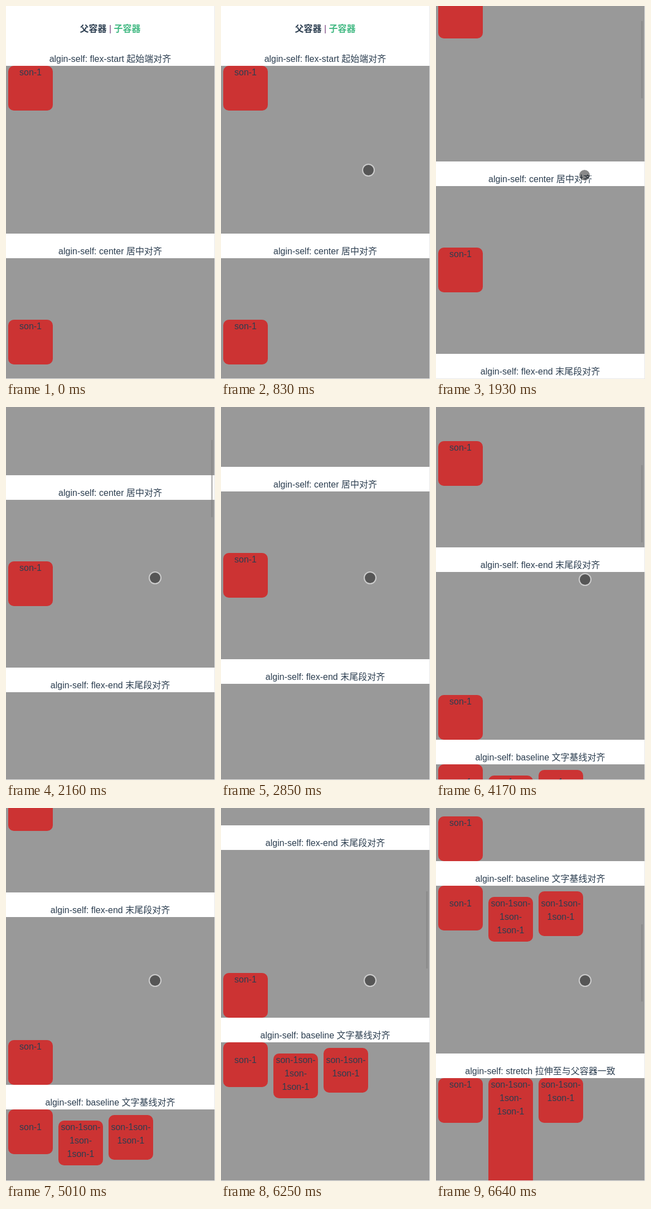
These frames come from a looping animation (375x667 px, 8000 ms). An HTML page:

```html
<!DOCTYPE html>
<html lang="zh-CN">
<head>
<meta charset="utf-8">
<title>align-self</title>
<style>
  html, body { margin: 0; width: 100%; height: 100%; overflow: hidden; background: #e6e6e6; }
  #view {
    position: absolute; left: 0; top: 0; width: 374px; height: 666px;
    overflow: hidden; background: #fff; color: #2c3e50; text-align: center;
    font: 16px/24px Arial, "Liberation Sans", "Noto Sans CJK SC", "Noto Sans CJK", sans-serif;
  }
  #page { position: absolute; left: 0; top: 0; width: 374px; }
  nav { height: 24px; padding: 29px 0 30px; }
  nav b:last-child { color: #42b983; }
  nav i { font-style: normal; color: #75407c; }
  h2 { margin: 0; height: 24px; font: inherit; white-space: nowrap; }
  .box {
    display: flex; align-items: flex-start; gap: 10px; box-sizing: border-box;
    height: 300px; margin-bottom: 20px; padding-left: 4px; background: #999;
  }
  .son {
    flex: none; box-sizing: border-box; width: 80px; height: 80px;
    border-radius: 10px; background: #c33; white-space: pre;
  }
  #thumb { position: absolute; left: 368px; top: 0; width: 3px; height: 138px; background: rgba(128, 128, 128, .5); }
  #touch {
    position: absolute; left: -11.5px; top: -11.5px; width: 19px; height: 19px; border-radius: 50%;
    border: 2px solid rgba(255, 255, 255, .5);
    background: rgba(20, 20, 20, .5); background-clip: padding-box;
  }
</style>
</head>
<body>
<div id="view">
  <div id="page"><nav><b>父容器</b><i> | </i><b>子容器</b></nav></div>
  <div id="thumb"></div>
  <div id="touch"></div>
</div>
<script>
const LOOP = 8000;
const $ = id => document.getElementById(id);
const page = $('page'), thumb = $('thumb'), touch = $('touch');

const one = ['son-1'];
const three = ['son-1', 'son-1son-\n1son-\n1son-1', 'son-1son-\n1son-1'];
const sections = [
  ['flex-start', '起始端对齐', one],
  ['center', '居中对齐', one],
  ['flex-end', '末尾段对齐', one],
  ['baseline', '文字基线对齐', three],
  ['stretch', '拉伸至与父容器一致', three]
];

function add(parent, tag, cls, text = '') {
  const el = document.createElement(tag);
  el.className = cls;
  el.textContent = text;
  parent.appendChild(el);
  return el;
}

for (const [align, label, sons] of sections) {
  add(page, 'h2', '', `algin-self: ${align} ${label}`);
  const box = add(page, 'div', 'box');
  sons.forEach((text, i) => {
    const son = add(box, 'div', 'son', text);
    son.style.alignSelf = align;
    if (align === 'baseline') son.style.paddingTop = [20, 0, 10][i] + 'px';
    if (align === 'stretch' && i === 1) son.style.height = 'auto';
  });
}

// bias skews the easing towards an early (< 1) or late (> 1) middle
const scrolls = [
  { start: 1780, end: 2240, steps: 7, by: 300, bias: .935 },
  { start: 3940, end: 4400, steps: 7, by: 300, bias: .874 },
  { start: 6100, end: 6640, steps: 8, by: 400, bias: 1.032 }
];
const entry = [353, 993];
const moves = [
  { start: 210, end: 590, steps: 6, to: [263, 298], bend: [244, 400] },
  { start: 760, end: 830, steps: 2, to: [264, 293] },
  { start: 1780, end: 2240, steps: 7, to: [267, 305] },
  { start: 3940, end: 4400, steps: 7, to: [267, 308] }
];

const clamp = v => Math.max(0, Math.min(1, v));
const smooth = p => p * p * (3 - 2 * p);
const easeOut = p => 1 - (1 - p) ** 2.5;

// The picture refreshes in even ticks, so progress moves in hard steps
function progress(t, { start, end, steps }) {
  if (t < start) return 0;
  const tick = (end - start) / (steps - 1);
  return clamp((Math.floor((t - start + 6) / tick) + 1) / steps);
}

function scrollAt(t) {
  return scrolls.reduce((y, s) => y + s.by * smooth(progress(t, s) ** s.bias), 0);
}

function touchAt(t) {
  let pos = entry;
  for (const m of moves) {
    const u = easeOut(progress(t, m)), from = pos;
    pos = m.to.map((to, k) => {
      const mid = m.bend ? m.bend[k] : (from[k] + to) / 2;
      return (1 - u) ** 2 * from[k] + 2 * u * (1 - u) * mid + u * u * to;
    });
    if (u < 1) break;
  }
  return pos.map(Math.round);
}

// The thumb rests 300 ms after a scroll, then fades for 300 ms
function thumbAlpha(t) {
  const last = scrolls.filter(s => t >= s.start).pop();
  return last ? clamp(1 - (t - last.end - 300) / 300) : 0;
}

function draw(t) {
  const y = Math.round(scrollAt(t));
  const [tx, ty] = touchAt(t);
  page.style.transform = `translateY(${-y}px)`;
  thumb.style.transform = `translateY(${Math.round(y * .2075)}px)`;
  thumb.style.opacity = thumbAlpha(t);
  touch.style.transform = `translate(${tx}px, ${ty}px)`;
}

let origin = null;
function tick(now) {
  if (origin === null) origin = now;
  draw((now - origin) % LOOP);
  requestAnimationFrame(tick);
}
draw(0);
requestAnimationFrame(tick);
</script>
</body>
</html>
```
